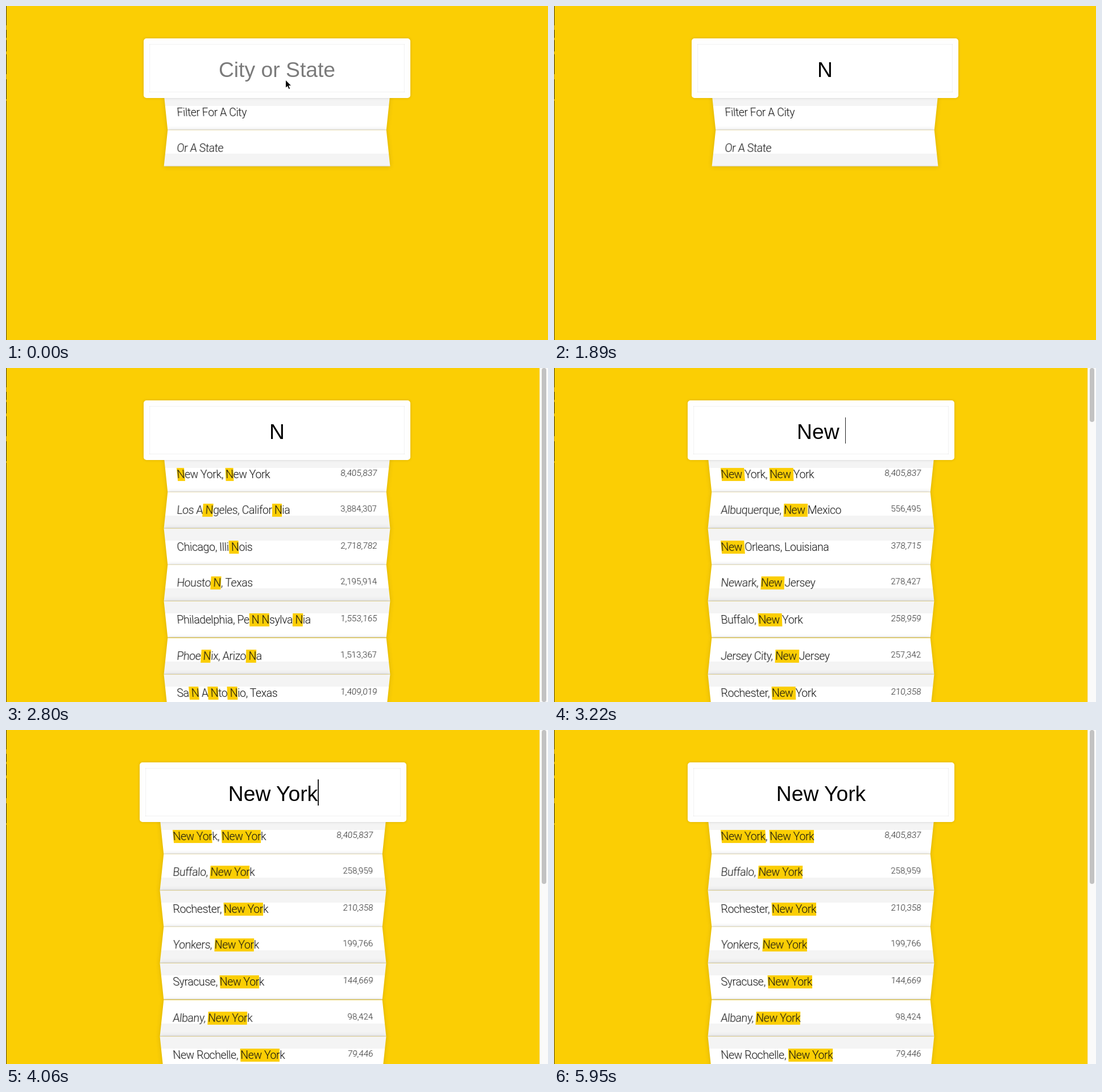
Animation, 953 px wide and 588 px high, one loop 6020 ms. Source, as an HTML page:

```html
<!DOCTYPE html>
<html lang="en">
<head>
<meta charset="utf-8">
<title>City search</title>
<style>
  * { box-sizing: border-box; margin: 0; padding: 0; }
  html, body { width: 100%; height: 100%; overflow: hidden; background: #fbce04; }
  #stage { position: relative; width: 953px; height: 588px; overflow: hidden; background: #fbce04; }
  #stage > * { position: absolute; }

  #edge {
    left: 0; top: 0; width: 1px; height: 588px;
    background: linear-gradient(#4a3c14 0 34px, #b89a30 34px 42px, #332a12 42px 56px, #b89a30 56px 60px,
      #332a12 60px 80px, #c9a828 80px 85px, #332a12 85px 120px, #b89a30 120px 129px, #332a12 129px 164px,
      #b89a30 164px 167px, #5a4810 167px);
  }

  #page { left: 0; top: 0; width: 953px; height: 588px; isolation: isolate; }
  #page > * { position: absolute; }

  #search {
    left: 242px; top: 57px; width: 469px; height: 105px; z-index: 2;
    border: 10px solid #fefefe; border-radius: 5px; background: #fff;
    box-shadow: 0 0 5px rgba(0,0,0,.14), inset 0 0 2px rgba(0,0,0,.19);
    font: 37.3px/46px "Liberation Sans", Arial, sans-serif;
    text-align: center; white-space: pre;
  }
  #field { position: relative; top: 22px; display: inline-block; height: 46px; min-width: 1px; }
  #caret { position: absolute; left: 100%; top: -2px; width: 1.4px; height: 46px; background: #222; }

  #list {
    left: 281.4px; top: 154.9px; width: 390.8px; list-style: none;
    font: 300 19.54px/24px Roboto, "Helvetica Neue", sans-serif; color: #111;
  }
  #list li {
    display: flex; justify-content: space-between;
    height: 64.13px; padding: 20.5px 19.5px 0;
    border-bottom: 1px solid #d8d8d8;
    box-shadow: 0 0 8px rgba(0,0,0,.15);
  }
  #list li:nth-child(odd) {
    transform: perspective(97.7px) rotateX(-3deg);
    background: linear-gradient(#f4f4f4 33%, #fff 33%);
  }
  #list li:nth-child(even) {
    transform: translateY(-1.2px) perspective(97.7px) rotateX(3deg);
    background: linear-gradient(#fff 67%, #f4f4f4 67%);
  }
  .name { letter-spacing: -.45px; }
  .hl { background: #fbce04; }
  .count { font-size: 15px; line-height: 18px; color: #222; }

  #bar { right: 0; top: 0; width: 15px; height: 588px; background: #fafafa; border-left: 1px solid #f3ecd2; }
  #thumb { position: absolute; left: 3px; top: 0; width: 8px; border-radius: 4px; background: #c2c2c2; }
  #mouse { left: 0; top: 0; width: 24px; height: 28px; overflow: visible; }
</style>
</head>
<body>
<div id="stage">
  <div id="page">
    <div id="search"><span id="field"><span id="text"></span><span id="caret"></span></span></div>
    <ul id="list"></ul>
  </div>
  <div id="bar"><div id="thumb"></div></div>
  <div id="edge"></div>
  <svg id="mouse">
    <path id="arrow" d="M0 0V14.5L3.4 11.4L5.7 16.6L8.2 15.5L6 10.4H10.4Z" fill="#000" stroke="#fff" stroke-width="1"/>
    <g id="beam" fill="none">
      <path d="M-3 -8.5Q0 -8.5 0 -6.5Q0 -8.5 3 -8.5M0 -6.5V6.5M-3 8.5Q0 8.5 0 6.5Q0 8.5 3 8.5M-2 2H2" stroke="#fff" stroke-width="2.6"/>
      <path d="M-3 -8.5Q0 -8.5 0 -6.5Q0 -8.5 3 -8.5M0 -6.5V6.5M-3 8.5Q0 8.5 0 6.5Q0 8.5 3 8.5M-2 2H2" stroke="#222" stroke-width="1.2"/>
    </g>
  </svg>
</div>
<script>
const LOOP = 6020, PLACEHOLDER = 'City or State', LIST_LAG = 70;
const FIRST_KEY = 1890, LIST_SHOWN = 2800, LAYOUT_SHIFT = 2870;

const cities = `New York, New York|8,405,837
Los Angeles, California|3,884,307
Chicago, Illinois|2,718,782
Houston, Texas|2,195,914
Philadelphia, Pennsylvania|1,553,165
Phoenix, Arizona|1,513,367
San Antonio, Texas|1,409,019
Memphis, Tennessee|653,450
Nashville-Davidson, Tennessee|634,464
Las Vegas, Nevada|603,488
Albuquerque, New Mexico|556,495
Omaha, Nebraska|434,353
Minneapolis, Minnesota|400,070
New Orleans, Louisiana|378,715
Newark, New Jersey|278,427
Buffalo, New York|258,959
Jersey City, New Jersey|257,342
Rochester, New York|210,358
Yonkers, New York|199,766
Syracuse, New York|144,669
Albany, New York|98,424
New Rochelle, New York|79,446`.split('\n').map(line => line.split('|'));

// When each typed value reaches the field
const keys = [[FIRST_KEY, 'N'], [2940, 'Ne'], [3010, 'New'], [3150, 'New '], [3290, 'New Y'],
  [3500, 'New Yo'], [3780, 'New Yor'], [4060, 'New York']];
const thumbHeights = { 'N': 588, 'Ne': 70, 'New': 95, 'New ': 95 };

const $ = id => document.getElementById(id);
const show = (el, on) => { el.style.display = on ? '' : 'none'; };
const lastKey = t => keys.filter(k => k[0] <= t).pop() || [0, ''];

function row(name, count = '') {
  return `<li><span class="name">${name}</span><span class="count">${count}</span></li>`;
}

function listHtml(query) {
  if (!query) return row('Filter For A City') + row('Or A State');
  const match = new RegExp(query, 'gi');
  return cities.filter(([name]) => name.search(match) >= 0).slice(0, 7)
    .map(([name, count]) => row(name.replace(match, `<span class="hl"> ${query}</span>`), count))
    .join('');
}

function caretOn(t, keyTime) {
  if (t < FIRST_KEY) return t >= 840 && t < 1330;
  return t >= LAYOUT_SHIFT && (t - keyTime) % 1000 < 500;
}

let shownQuery = null, shownText = null;

function draw(t) {
  const [keyTime, value] = lastKey(t);
  const query = t < LIST_SHOWN ? '' : lastKey(t - LIST_LAG)[1];

  if (query !== shownQuery) {
    $('list').innerHTML = listHtml(query);
    $('thumb').style.height = (thumbHeights[query] || 271) + 'px';
    shownQuery = query;
  }
  const text = value || PLACEHOLDER;
  if (text !== shownText) {
    $('text').textContent = text;
    $('text').style.color = value ? '#000' : '#7b7b7b';
    shownText = text;
  }

  $('caret').style.left = value ? '100%' : '50%';
  show($('caret'), caretOn(t, keyTime));
  show($('bar'), t >= LIST_SHOWN);
  $('page').style.left = t >= LAYOUT_SHIFT ? '-7px' : '0';

  const p = Math.min(t / 700, 1), ease = p * p * (3 - 2 * p);
  const x = 491.5 - 21.5 * ease, y = 130 - 17.5 * ease;
  $('mouse').style.transform = `translate(${x}px, ${y}px)`;
  show($('mouse'), t < FIRST_KEY);
  show($('arrow'), t < 140);
  show($('beam'), t >= 140);
}

const start = performance.now();
function tick() {
  draw((performance.now() - start) % LOOP);
  requestAnimationFrame(tick);
}
tick();
</script>
</body>
</html>
```
